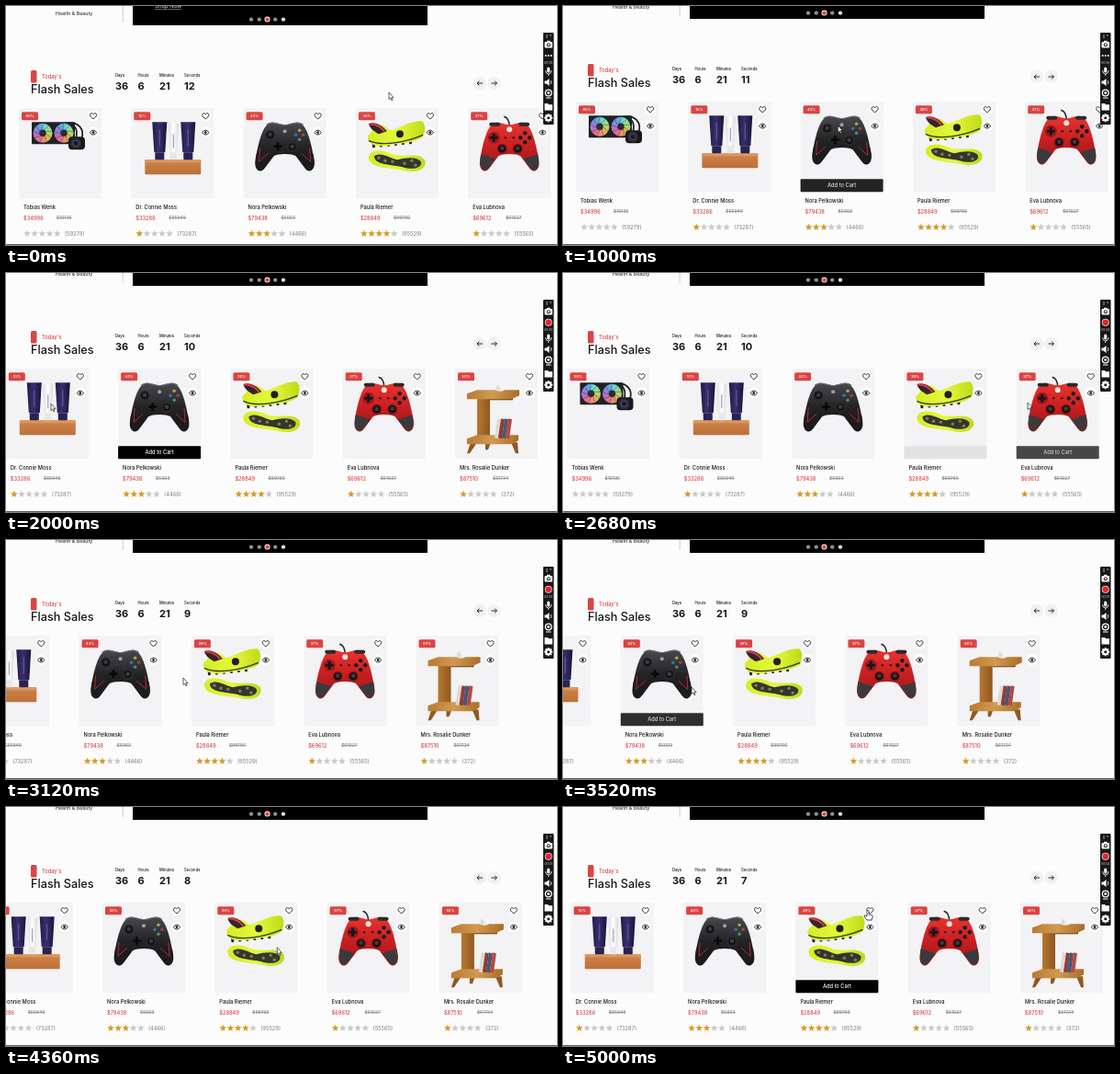
Recreate the animation shown at these times as an HTML page with a canvas. Size 600x260 px, loop 5.04 s.

```html
<!DOCTYPE html>
<html lang="en">
<head>
<meta charset="utf-8">
<title>Flash Sales</title>
<style>
html, body { margin: 0; width: 100%; height: 100%; overflow: hidden; background: #fdfcfd; }
canvas { display: block; width: 600px; height: 260px; }
</style>
</head>
<body>
<canvas id="stage"></canvas>
<script>
const LOOP = 5040, TAU = Math.PI * 2;
const RED = '#db4444', INK = '#161616', GOLD = '#d69b27';
const canvas = document.getElementById('stage');
const dpr = window.devicePixelRatio || 1;
canvas.width = 600 * dpr;
canvas.height = 260 * dpr;
const c = canvas.getContext('2d');

// time, carousel offset
const slide = [[0, 0], [1240, 0], [1900, -136.5], [2080, -136.5], [2620, -9.5], [2720, -9.5],
  [3120, -179], [3920, -212.5], [4020, -212.5], [4560, -127.5]];
// time, pointer x, pointer y
const pointer = [[0, 417, 94], [500, 400, 100], [900, 300, 130], [1240, 297, 130], [1900, 49, 142],
  [2080, 49, 142], [2620, 506, 141], [2720, 506, 141], [3120, 193, 150], [3400, 140, 160],
  [3640, 140, 160], [3920, 179, 169], [4500, 315, 150], [4840, 332, 112]];
// card, pointer enters, pointer leaves
const hovers = [[2, 830, 2080], [3, 2290, 2495], [4, 2540, 2850], [2, 3360, 4120], [3, 4780, 9999]];

const cards = [
  { name: 'Tobias Wenk', off: '90%', price: '$34996', old: '$10135', stars: 0, votes: 59279, art: cooler },
  { name: 'Dr. Connie Moss', off: '10%', price: '$33286', old: '$65949', stars: 1, votes: 73287, art: tubes },
  { name: 'Nora Pelkowski', off: '43%', price: '$79438', old: '$5003', stars: 3, votes: 4466, art: blackPad },
  { name: 'Paula Riemer', off: '39%', price: '$28849', old: '$99790', stars: 4, votes: 95529, art: shoes },
  { name: 'Eva Lubnova', off: '37%', price: '$69612', old: '$61027', stars: 1, votes: 55565, art: redPad },
  { name: 'Mrs. Rosalie Dunker', off: '50%', price: '$87510', old: '$61734', stars: 1, votes: 372, art: table }
];

const clamp = v => Math.max(0, Math.min(1, v));
const smooth = v => { v = clamp(v); return v * v * (3 - 2 * v); };

function sample(keys, t) {
  let i = 0;
  while (i < keys.length - 1 && keys[i + 1][0] <= t) i++;
  const a = keys[i], b = keys[i + 1] || a;
  const k = b === a ? 0 : smooth((t - a[0]) / (b[0] - a[0]));
  return a.slice(1).map((v, j) => v + (b[j + 1] - v) * k);
}

function rect(x, y, w, h, color, r = 0) {
  c.fillStyle = color;
  c.beginPath();
  c.roundRect(x, y, w, h, r);
  c.fill();
}
function oval(x, y, rx, color, ry = rx, turn = 0) {
  c.fillStyle = color;
  c.beginPath();
  c.ellipse(x, y, rx, ry, turn, 0, TAU);
  c.fill();
}
function shape(d, fill, stroke, width = 1) {
  const p = new Path2D(d);
  if (fill) { c.fillStyle = fill; c.fill(p); }
  if (stroke) { c.strokeStyle = stroke; c.lineWidth = width; c.stroke(p); }
}
function text(s, x, y, size, color = INK, weight = 400, align = 'left') {
  c.font = `${weight} ${size}px Inter, "Open Sans", sans-serif`;
  c.textAlign = align;
  c.fillStyle = color;
  c.fillText(s, x, y);
  return c.measureText(s).width;
}
function at(x, y, draw) {
  c.save();
  c.translate(x, y);
  draw();
  c.restore();
}
function gradient(x0, y0, x1, y1, ...colors) {
  const g = c.createLinearGradient(x0, y0, x1, y1);
  colors.forEach((color, i) => g.addColorStop(i / (colors.length - 1), color));
  return g;
}
function star(x, y, color) {
  c.beginPath();
  for (let i = 0; i < 10; i++) {
    const r = i % 2 ? 1.8 : 4, a = i * TAU / 10 - TAU / 4;
    c.lineTo(x + r * Math.cos(a), y + r * Math.sin(a));
  }
  c.closePath();
  c.fillStyle = color;
  c.fill();
}

function cooler() {
  shape('M48 17 C66 12 72 24 68 34 M56 18 C63 18 64 26 62 34', null, '#222', 1.8);
  rect(14, 15, 47, 24, '#202126', 1);
  for (const x of [26, 49]) {
    const rainbow = c.createConicGradient(-1, x, 27);
    ['#7be0c2', '#b4d65c', '#f0a15a', '#e66a8e', '#a674d4', '#5aa5e6', '#7be0c2']
      .forEach((color, i) => rainbow.addColorStop(i / 6, color));
    oval(x, 27, 10.5, rainbow);
    for (let i = 0; i < 9; i++) {
      const a = i * TAU / 9;
      c.strokeStyle = 'rgba(40,40,60,.45)';
      c.lineWidth = .9;
      c.beginPath();
      c.moveTo(x + 3 * Math.cos(a), 27 + 3 * Math.sin(a));
      c.lineTo(x + 10 * Math.cos(a + .5), 27 + 10 * Math.sin(a + .5));
      c.stroke();
    }
    oval(x, 27, 3.7, '#2a2b30');
  }
  rect(54, 31, 18, 14, '#17181c', 4);
  oval(62, 38, 6, '#2b2c35');
  oval(62, 38, 3.6, '#4a4a70');
  oval(62, 38, 2.5, '#17181c');
}

function tubes() {
  const navy = gradient(22, 0, 38, 0, '#1c1844', '#37306e', '#1b173f');
  rect(15, 56, 61, 16, gradient(0, 56, 0, 72, '#cf8449', '#bd7039'), 1);
  rect(15, 56, 61, 3, '#dc985f', 1);
  for (const x of [0, 31]) at(x, 0, () => {
    shape('M23 15 H39 L37 48 H25 Z', navy);
    rect(26, 48, 10, 8, '#282354', 1);
    shape('M31 23 V41', null, '#7f79a5', .7);
  });
  shape('M40.5 16 H51.5 L50 48 H42 Z', gradient(40, 0, 52, 0, '#dadade', '#ffffff', '#d5d5da'));
  rect(42.5, 48, 7, 8, '#e7e7ea', 1);
  shape('M46 28 V43', null, '#77758a', .8);
}

function pad(body, grip, accent) {
  const outline = 'M27 17 C33 13 39 18 45 18 C51 18 57 13 63 17 C71 22 75 45 77 56 ' +
    'C79 68 71 72 66 64 L57 52 C52 49 38 49 33 52 L24 64 C19 72 11 68 13 56 C15 45 19 22 27 17 Z';
  shape(outline, body);
  shape('M14 50 C11 66 17 71 23 64 L30 55 Z M76 50 C79 66 73 71 67 64 L60 55 Z', grip);
  if (accent) shape('M18 43 L17 58 L27 49 M72 43 L73 58 L63 49', null, accent, 1);
}
function stick(x, y, rim) {
  oval(x, y, 5.5, rim);
  oval(x, y, 4, '#111');
  oval(x, y - .5, 2.3, '#3b3b40');
}

function blackPad() {
  pad(gradient(0, 15, 0, 68, '#4a4a4e', '#242427', '#121214'), '#1c1c1f', '#b52b32');
  shape('M25 18 C32 13 37 18 43 18 M47 18 C53 18 58 13 65 18', null, '#68686c', 1.3);
  stick(29, 29, '#2c2c30');
  stick(53, 42, '#2c2c30');
  rect(33, 40, 9, 2.6, '#09090a');
  rect(36.2, 36.8, 2.6, 9, '#09090a');
  oval(45, 25, 2, '#a0a0a4');
  [[61, 24, '#b8a13c'], [65, 29, '#b23b3b'], [57, 29, '#3b6eb2'], [61, 34, '#3c9860']]
    .forEach(([x, y, color]) => oval(x, y, 1.8, color));
}

function redPad() {
  shape('M45 20 C45 13 43 10 39 9', null, '#222', 1.4);
  pad(gradient(0, 15, 0, 68, '#e8342f', '#c81f21', '#95171a'), '#3a3a3d');
  rect(23, 15.5, 12, 4, '#2a2a2c', 2);
  rect(55, 15.5, 12, 4, '#2a2a2c', 2);
  oval(45, 23, 3, '#eee5e2');
  stick(37, 44, '#861417');
  stick(54, 44, '#861417');
  oval(28, 32, 6.5, '#a3181b');
  rect(23.5, 30.5, 9, 3, '#18181a');
  rect(26.5, 27.5, 3, 9, '#18181a');
  [[62, 27], [67, 32], [57, 32], [62, 37]].forEach(([x, y]) => oval(x, y, 2.2, '#1c1c1e'));
  rect(39, 31, 3, 2, '#222', 1);
  rect(48, 31, 3, 2, '#222', 1);
}

function shoes() {
  const lime = gradient(14, 0, 76, 0, '#d4ed25', '#e4f83b', '#bfd916');
  for (let i = 0; i < 6; i++) rect(18 + i * 8, 38 - i * .8, 3, 5, '#27291e', 1);
  shape('M13 30 C17 26 22 19 29 18 L38 24 C48 22 56 14 72 14 C77 18 75 27 73 31 C64 38 48 38 38 40 C27 42 12 42 13 30 Z', lime);
  shape('M14 17 C21 14 28 18 34 25 L25 28 C20 25 16 23 14 17 Z', '#33252a');
  shape('M15 17 C22 17 27 20 31 25', null, '#e23a48', 2);
  shape('M14 35 C29 42 54 37 73 29', null, '#32351f', 1.3);
  oval(48, 28, 4, '#20221b');
  shape('M14 53 C16 44 30 45 40 50 C52 54 68 47 75 56 C79 66 66 71 54 68 C40 65 14 66 14 53 Z', lime);
  shape('M20 52 C28 47 36 54 45 56 C57 53 67 53 71 58 C73 66 60 67 51 64 C39 61 20 62 20 52 Z', '#34362e');
  [[25, 54], [32, 57], [40, 58], [53, 60], [61, 57], [65, 62]]
    .forEach(([x, y]) => oval(x, y, 1.7, '#77805a'));
}

function table() {
  const wood = gradient(12, 0, 70, 0, '#b97a32', '#d09a50', '#a96c2a');
  shape('M17 80 L13 92 H16 L24 80 Z M61 80 L66 92 H69 L68 80 Z M33 80 L33 88 H36 L39 80 Z', '#8d5924');
  shape('M24 31 H38 V76 H24 Z', gradient(24, 0, 38, 0, '#b67731', '#90591f'));
  shape('M38 31 H63 V34 H38 Z', '#774817');
  shape('M13 27 L24 23 H70 V29 L61 33 H13 Z', wood);
  shape('M13 76 L24 72 H69 V78 L61 82 H13 Z', wood);
  ['#dfd9d1', '#923d35', '#43597a', '#b54940'].forEach((color, i) =>
    shape(`M${43 + i * 4} 75 L${46 + i * 4} 54 L${50 + i * 4} 55 L${47 + i * 4} 76 Z`, color));
  oval(49, 22, 5, '#ececea', 2.4);
  rect(45, 18, 3, 5, '#d8ddd5', 1);
  rect(51, 18, 3, 5, '#f8f8f4', 1);
}

function drawHeart(x, y) {
  at(x, y, () => shape('M0 3 C-7 -1 -2 -5 0 -2 C2 -5 7 -1 0 3 Z', null, INK, .9));
}
function drawEye(x, y) {
  at(x, y, () => {
    shape('M-3.8 0 Q0 -5 3.8 0 Q0 5 -3.8 0 Z', null, INK, .9);
    oval(0, 0, 1.4, INK);
  });
}

function drawCard(card, hover) {
  rect(0, 0, 90, 98, '#f3f2f4', 1);
  card.art();
  rect(3, 4, 18, 9, RED, 1.5);
  text(card.off, 12, 10, 4, '#fff', 500, 'center');
  oval(81, 8, 6, '#fff');
  oval(81, 26, 6, '#fff');
  drawHeart(81, 8.4);
  drawEye(81, 26.3);
  if (hover > 0) {
    c.globalAlpha = hover;
    rect(0, 84, 90, 14, '#000', 1);
    text('Add to Cart', 45, 92.8, 5.7, '#fff', 500, 'center');
    c.globalAlpha = 1;
  }
  text(card.name, 5, 109.4, 5.7, INK, 500);
  text(card.price, 5, 121.3, 5.7, RED, 500);
  const w = text(card.old, 41, 121, 4.9, '#858585', 500);
  rect(41, 119, w, .6, '#777');
  for (let i = 0; i < 5; i++) star(9 + i * 8.2, 136.3, i < card.stars ? GOLD : '#c9c9cb');
  text(`(${card.votes})`, 50, 138.2, 5.7, '#8d8d8f', 500);
}

function drawHeader(t) {
  text('Health & Beauty', 54, 3.4, 5.3);
  rect(126.8, 0, .7, 11, '#bbb');
  rect(126.8, -7, .7, 8, '#bbb');
  rect(138, -10, 321, 24, '#000');
  text('Shop Now', 162, -5.5, 6, '#eee');
  rect(162, -3.5, 29, .6, '#bbb');
  [267, 275.8, 284.5, 293.2, 302].forEach((x, i) => {
    if (i === 2) oval(x, 7.6, 3, '#fff');
    oval(x, 7.6, 2.2, ['#909090', '#909090', RED, '#909090', '#ddd'][i]);
  });
  rect(27, 63, 6.5, 13.5, RED, 1.5);
  text("Today's", 39, 72.2, 5.7, RED, 500);
  text('Flash Sales', 27, 88, 12.7, INK, 500);
  const seconds = 12 - Math.floor((t + 40) / 1000);
  [['Days', 36, 119], ['Hours', 6, 143.5], ['Minutes', 21, 167], ['Seconds', seconds, 194]]
    .forEach(([label, value, x]) => {
      text(label, x, 70, 4.2, INK, 500);
      text(value, x, 84, 11, INK, 700);
    });
  [[516, -1], [531.5, 1]].forEach(([x, dir]) => {
    oval(x, 77, 7.2, '#f1f0f2');
    at(x, 77, () => {
      c.scale(dir, 1);
      shape('M-3 0 H3 M.6 -2.4 L3 0 L.6 2.4', null, INK, .9);
    });
  });
}

function drawToolbar(t) {
  rect(585, 29, 11.5, 100, '#181818', 1);
  shape('M588 32 H590 M592 32 H594 M588 34 H590', null, '#ccc', .8);
  rect(586.5, 39, 8.5, 6.5, '#fff', 1);
  rect(589, 37.8, 3.5, 2, '#fff');
  oval(590.8, 42.2, 2, '#181818');
  oval(590.8, 42.2, 1.1, '#fff');
  if (t < 1200) {
    for (let i = -1; i < 2; i++) oval(590.7 + i * 3, 54, 1, '#fff');
  } else {
    oval(590.7, 53.8, 4, '#f3dede');
    oval(590.7, 53.8, 3.2, '#e5232e');
  }
  const elapsed = t < 3400 ? 0 : t < 4400 ? 1 : 2;
  text(`00:0${elapsed}`, 590.7, 63, 3.3, '#ddd', 400, 'center');
  rect(589.2, 66.5, 3, 6, '#fff', 1.5);
  shape('M587.5 70 Q587.7 74 590.7 74 Q593.7 74 594 70 M590.7 74 V76', null, '#fff', .8);
  shape('M586.5 81.5 H588.5 L591.5 79 V87 L588.5 84.5 H586.5 Z', '#fff');
  shape('M593 81 Q595 83 593 85', null, '#fff', .8);
  oval(590.7, 94.5, 4, '#fff');
  oval(590.7, 94.5, 2.7, '#181818');
  oval(590.7, 94.5, 1.4, '#fff');
  shape('M588 100 H593.5', null, '#fff', 1);
  shape('M586.5 106 H590 L591 107.2 H595 V113.5 H586.5 Z', '#fff');
  at(590.7, 121.7, () => {
    for (let i = 0; i < 4; i++) {
      c.rotate(TAU / 8);
      rect(-1, -4.5, 2, 9, '#fff');
    }
    oval(0, 0, 3.4, '#fff');
    oval(0, 0, 1.5, '#181818');
  });
}

function drawPointer(t) {
  const [x, y] = sample(pointer, t);
  at(x, y, () => {
    if (t > 4800) {
      shape('M-1 1 Q0 -1 1 1 V5 L4.5 5.5 Q5.5 6 5 8 L4 11 H-1 L-4 7 Q-4 5.5 -2.5 6 L-1 7 Z', '#fff', '#222', .8);
    } else {
      shape('M0 0 V7.5 L1.7 6 L2.9 8.7 L4 8.2 L2.9 5.6 H5 Z', '#fff', '#222', .7);
    }
  });
}

function hoverLevel(index, t) {
  return Math.max(...hovers.map(([i, start, end]) =>
    i === index ? Math.min(clamp((t - start) / 200), clamp(1 - (t - end) / 200)) : 0));
}

function draw(t) {
  c.setTransform(dpr, 0, 0, dpr, 0, 0);
  c.fillStyle = '#fdfcfd';
  c.fillRect(0, 0, 600, 260);
  const scroll = 7 * (1 - smooth((t - 520) / 200));
  const [offset] = sample(slide, t);
  at(0, scroll, () => {
    drawHeader(t);
    cards.forEach((card, i) => {
      at(14 + i * 122.3 + offset, 104.3, () => drawCard(card, hoverLevel(i, t)));
    });
  });
  rect(0, 259, 600, 1, '#59625c');
  drawToolbar(t);
  drawPointer(t);
}

const begin = performance.now();
function tick() {
  draw((performance.now() - begin) % LOOP);
  requestAnimationFrame(tick);
}
tick();
</script>
</body>
</html>
```
